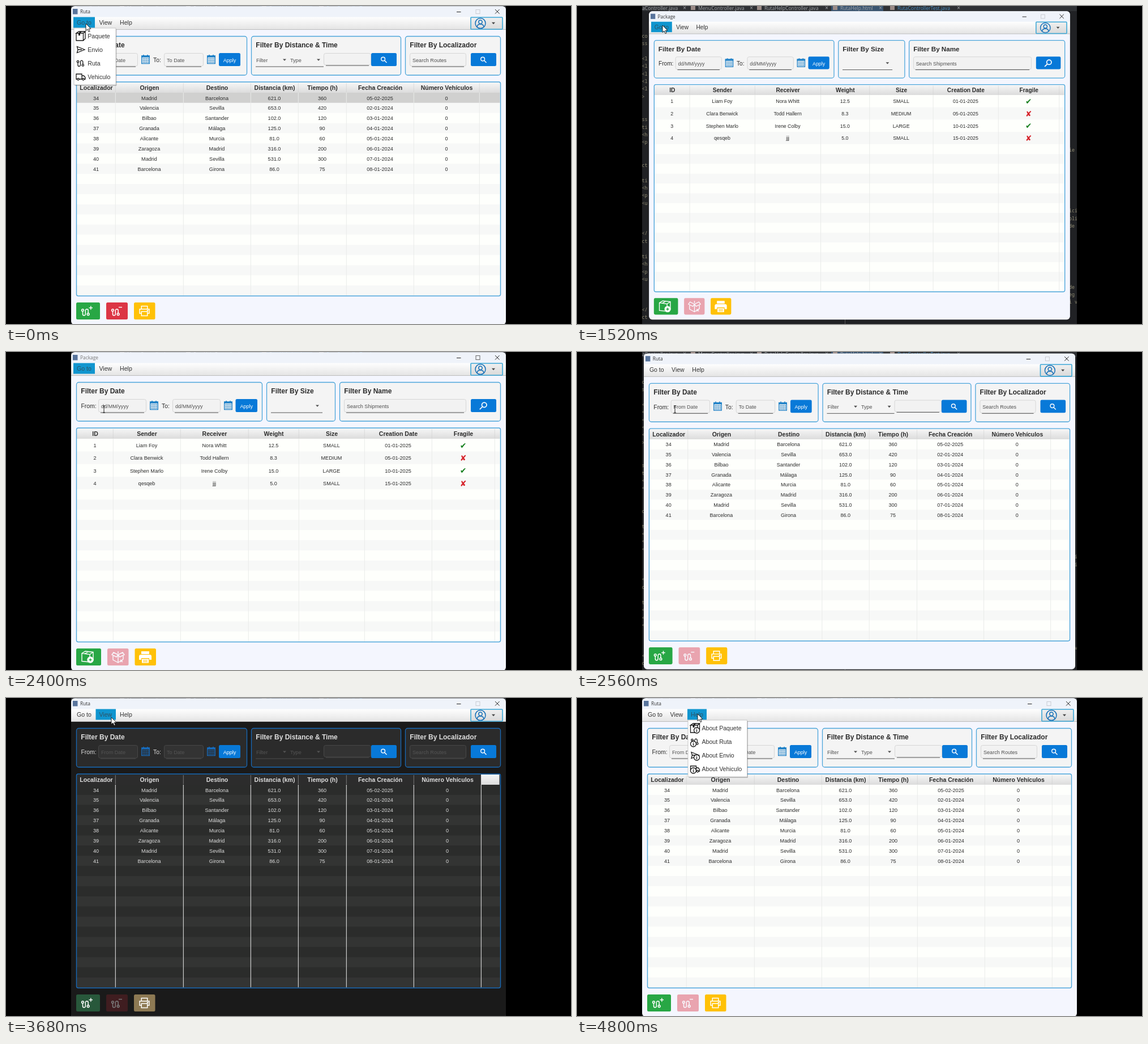
An HTML page that plays this animation: 998 px wide and 561 px high, repeating every 4880 ms.

```html
<!DOCTYPE html>
<html lang="es">
<head>
<meta charset="utf-8">
<title>Ruta</title>
<style>
html, body { margin: 0; width: 100%; height: 100%; overflow: hidden; background: #000; }
svg { display: block; --body: #f4f6fe; --panel: #f4f4f4; --edge: #4ba5da; --text: #2b2b2b; --hint: #505050;
  --field: #f2f2f2; --rim: #d6d6d6; --line: #555; --even: #fefffc; --odd: #f7f8f7; --grid: #e9ebe9;
  --head: url(#bar); --add: #28a745; --del: #dc3545; --print: #ffc107; --cal: #2283c8; }
.dark { --body: #1a1a1a; --panel: #2b2b2b; --edge: #1769b8; --text: #dedede; --hint: #555; --field: #333;
  --rim: #474747; --line: #4c4c4c; --even: #2b2c2b; --odd: #333433; --grid: #f0f0f0; --head: #2c2c2c;
  --add: #28583b; --del: #72222a; --print: #8d7953; --cal: #1769b8; }
.chrome { --text: #333; }
text { font-family: "Liberation Sans", Arial, sans-serif; fill: var(--text); white-space: pre; }
.title { font-family: "Open Sans", sans-serif; }
.code { font-family: "Noto Sans Mono", monospace; fill: #8f8a72; }
.tab { font-family: "Open Sans", sans-serif; fill: #a5a8ab; }
.blue { fill: #4b93c8; }
.hint { fill: var(--hint); }
.lit { fill: #fff; }
.yes { font-family: "DejaVu Sans", sans-serif; fill: #17801f; }
.no { font-family: "DejaVu Sans", sans-serif; fill: #d6232b; }
.item > rect { fill: none; }
.hot > rect { fill: #1095cf; }
.hot > text { fill: #2f5263; }
.unfocused { --text: #777; }
.ink { fill: none; stroke: #151515; stroke-width: 1.3; }
.white { fill: none; stroke: #fff; stroke-width: 1.4; }
</style>
</head>
<body>
<script>
const LOOP = 4880;

// Markup helpers
const rect = (x, y, w, h, fill, more = '') => `<rect x="${x}" y="${y}" width="${w}" height="${h}" fill="${fill}" ${more}/>`;
const text = (x, y, s, size, more = '') =>
  `<text x="${x}" y="${(y + size * .36).toFixed(2)}" font-size="${size}" ${more}>${s}</text>`;
const mid = (x, y, s, size, more = '') => text(x, y, s, size, 'text-anchor="middle" ' + more);
const path = (d, more = '') => `<path d="${d}" ${more}/>`;
const circle = (x, y, r, more = '') => `<circle cx="${x}" cy="${y}" r="${r}" ${more}/>`;
const group = (cls, body, more = '') => `<g class="${cls}" ${more}>${body}</g>`;
const at = (x, y, body, cls = '', k = 1) => group(cls, body, `transform="translate(${x} ${y}) scale(${k})"`);
const BOLD = 'font-weight="bold"';

// Icons, centred on 0,0
const route = circle(-5, -3, 1.7) + path('M-5 -1.3V3.2a2.2 2.2 0 0 0 4.4 0V-2.6a2.2 2.2 0 0 1 4.4 0V1.6') + circle(3.8, 3.4, 1.7);
const plane = path('M-6.5 -5.5L7 0L-6.5 5.5L-5 0ZM-5 0H2');
const truck = path('M-8 -5H2V4H-8ZM2 -2H5.5L8 1V4H2') +
  circle(-4.5, 4.2, 1.7, 'fill="#fff"') + circle(4.5, 4.2, 1.7, 'fill="#fff"');
const box = path('M-8 -5L-3.5 -8H8L4.5 -5ZM-8 -5V8H4.5V-5M4.5 8L8 4.5V-8') +
  path('M-4 -5L-1 -8H2L-1 -5V-1H-4Z', 'fill="#151515" stroke="none"');
const info = circle(3, 4, 5, 'fill="#fff"') + path('M3 3V7M3 1V2.2');
const lens = circle(-1.4, -1.4, 3.4) + path('M1.2 1.2L5 5');
const printer = path('M-5 -3V-8H5V-3M-5 4H-8V-3H8V4H5M-5 1H5V8H-5Z') + circle(5.3, -.6, .6, 'fill="#fff"');
const bigPrinter = rect(-7, -10, 14, 5, '#fff', 'stroke="none"') +
  path('M-11 5V-1a3 3 0 0 1 3 -3H8a3 3 0 0 1 3 3V5H7V2H-7V5Z', 'fill="#fff" stroke="none"') +
  rect(-6, 3.5, 12, 7, '#fff', 'stroke="none"') + path('M-4 6H4M-4 8.3H4', 'stroke="#ffc107" stroke-width="1"');
const parcel = path('M-10 -6L-4 -9.5L10 -8V6L4 9.5L-10 8ZM-10 -6L4 -4V9M4 -4L10 -8M-5 -5L2 -9') +
  circle(5, 5.5, 5, 'fill="#fff"') + path('M5 3V8M2.5 5.5H7.5', 'stroke="#28a745"');
const openParcel = path('M0 -4L-8 -8L-11 -4L-3 0L0 -4L8 -8L11 -4L3 0ZM-9 -2V5L0 10L9 4V-2M0 -4V10M0 -10V-6') +
  path('M4 5l4 4M8 5l-4 4');
const user = circle(0, 0, 9) + circle(0, -2.3, 3.2) + path('M-6 6.4C-5 0 5 0 6 6.4');

const caret = (x, y) => path(`M${x - 3} ${y - 1.6}h6l-3 3.4z`, 'fill="var(--hint)"');
const underline = (x1, x2, y = 107) => path(`M${x1} ${y}H${x2}`, 'stroke="var(--line)"');
const panel = (x1, x2, label) => rect(x1 + .5, 53.5, x2 - x1 - 1, 68.5, 'var(--panel)', 'stroke="var(--edge)" stroke-width="1.3" rx="4"') +
  text(x1 + 8.3, 69, label, 12, BOLD);
const field = (x1, x2, hint, h = 22.5) => rect(x1 + .5, 83.5, x2 - x1 - 1, h, 'var(--field)', 'stroke="var(--rim)" rx="3"') +
  underline(x1 + 4, x2 - 4, 84.5 + h) + text(x1 + 5, 95.5, hint, 9.1, 'class="hint"');
const blueButton = (x1, x2, body) => rect(x1, 83, x2 - x1, 23, '#0879d8', 'rx="2.5"') + body;
const search = (x1, x2) => blueButton(x1, x2, at((x1 + x2) / 2, 95, lens, 'white'));
const apply = (x1, x2) => blueButton(x1, x2, mid((x1 + x2) / 2, 95.5, 'Apply', 9.1, 'class="lit"'));
const action = (x1, x2, fill, body, more = '') => group('', rect(x1, 523, x2 - x1, 30, fill, 'rx="2.5"') + body, more);

function calendar(x) {
  let dots = '';
  for (let i = 0; i < 12; i++) dots += rect(x + 2.6 + i % 4 * 2.8, 92.3 + (i / 4 | 0) * 2.9, 1.8, 1.7, 'var(--cal)');
  return rect(x + .7, 88, 13.6, 13.5, 'none', 'stroke="var(--cal)" stroke-width="1.4"') +
    rect(x, 87.4, 15, 3.4, 'var(--cal)') + path(`M${x + 4} 86V89M${x + 11} 86V89`, 'stroke="var(--cal)" stroke-width="1.8"') + dots;
}

function dates(x, hint, w) {
  const to = x + w + 46;
  return text(132.5, 95.5, 'From:', 10.4) + field(x, x + w, hint[0]) + calendar(x + w + 6) +
    text(x + w + 27, 95.5, 'To:', 10.4) + field(to, to + w, hint[1]) + calendar(to + w + 6);
}

function table(heads, edges, rows, tall, selected) {
  const left = 125, right = 872.5, xs = [left, ...edges];
  let out = rect(124.5, 134.5, 749, 377, 'var(--even)', 'rx="3"'), y = 153;
  for (let i = 0; y < 510; i++) {
    const h = Math.min(i < rows.length ? tall : 17.9, 511 - y);
    out += rect(left, y, right - left, h, i === selected ? '#d0d0cf' : i % 2 ? 'var(--odd)' : 'var(--even)');
    (rows[i] || []).forEach((s, c) => {
      const mark = { '✔': 'yes', '✘': 'no' }[s];
      out += mid((xs[c] + xs[c + 1]) / 2, y + h / 2 + .3, s, mark ? 14 : 9.1, mark ? `class="${mark}"` : '');
    });
    y += h;
  }
  const last = edges[edges.length - 1];
  out += rect(left, 135, right - left, 18, 'var(--head)') + rect(last, 135, right - last - 1, 18, 'url(#bar)');
  heads.forEach((s, c) => out += mid((xs[c] + xs[c + 1]) / 2 + .5, 144.3, s, 10.5, BOLD));
  edges.forEach(x => out += path(`M${x + .3} 153V510.5`, 'stroke="var(--grid)"') +
    path(`M${x + .3} 136V152`, 'stroke="#ccc" stroke-opacity=".5"'));
  return out + rect(124.5, 134, 749, 377.5, 'none', 'stroke="var(--edge)" stroke-width="1.4" rx="3"');
}

const item = (x, y, w, h, body) => group('item', rect(x, y, w, h, 'none') + body);

function appWindow(id, title, body) {
  const bar = [['Go to', 119, 38, 125], ['View', 158.5, 35.5, 164.5], ['Help', 195, 34, 201]]
    .map(([s, x, w, tx]) => item(x, 19.5, w, 19, text(tx, 29.5, s, 10.6))).join('');
  const chrome = path('M115 20V6.5a6 6 0 0 1 6 -6H877a6 6 0 0 1 6 6V20Z', 'fill="#eff3fa"') +
    rect(118, 5, 8.5, 9.5, '#58749c') + text(131, 10.2, title, 8.4, 'class="title"') +
    path('M796 10.5h7.5', 'stroke="#222"') + rect(830, 6.5, 7, 7, 'none', 'class="max" stroke="#c9ccd2"') +
    path('M864 6l7.6 7.6m0 -7.6l-7.6 7.6', 'stroke="#222"') +
    rect(115, 19.5, 768, 22, 'url(#menubar)') + path('M115 41.5H883', 'stroke="#bcbcbc"') + group('bar', bar) +
    rect(821, 20, 56, 21, 'url(#button)', 'stroke="#3ba7d6" stroke-width="1.6" rx="1"') +
    at(838, 30.5, user, '').replace('class=""', 'fill="none" stroke="#1670b8" stroke-width="1.5"') +
    path('M858 28.8h6l-3 3.4z', 'fill="#444"');
  return `<g id="${id}">` + rect(115, .5, 768, 561.5, 'var(--body)', 'rx="6"') + group('chrome', chrome) + body + '</g>';
}

const ROUTES = `34,Madrid,Barcelona,621.0,360,05-02-2025
35,Valencia,Sevilla,653.0,420,02-01-2024
36,Bilbao,Santander,102.0,120,03-01-2024
37,Granada,Málaga,125.0,90,04-01-2024
38,Alicante,Murcia,81.0,60,05-01-2024
39,Zaragoza,Madrid,316.0,200,06-01-2024
40,Madrid,Sevilla,531.0,300,07-01-2024
41,Barcelona,Girona,86.0,75,08-01-2024`.split('\n').map(r => [...r.split(','), '0']);

const PARCELS = `1,Liam Foy,Nora Whitt,12.5,SMALL,01-01-2025,✔
2,Clara Benwick,Todd Hallern,8.3,MEDIUM,05-01-2025,✘
3,Stephen Marlo,Irene Colby,15.0,LARGE,10-01-2025,✔
4,qesqeb,jjj,5.0,SMALL,15-01-2025,✘`.split('\n').map(r => r.split(','));

const routes = (id, lastEdge, selected) => appWindow(id, 'Ruta',
  panel(124, 426, 'Filter By Date') + dates(163, ['From Date', 'To Date'], 70) + apply(376, 414) +
  panel(433, 698, 'Filter By Distance &amp; Time') +
  text(442, 95.5, 'Filter', 9.1, 'class="hint"') + caret(492, 95) + text(502, 95.5, 'Type', 9.1, 'class="hint"') + caret(552, 95) +
  underline(441, 561) + field(561, 645, '', 20.5) + search(645, 690) +
  panel(705, 874, 'Filter By Localizador') + field(713, 813, 'Search Routes') + search(821, 866) +
  table(['Localizador', 'Origen', 'Destino', 'Distancia (km)', 'Tiempo (h)', 'Fecha Creación', 'Número Vehículos'],
    [193, 313, 432, 516, 601, 720, lastEdge], ROUTES, 17.9, selected) +
  action(124, 166, 'var(--add)', at(141, 540, route, 'white', 1.1) + path('M146.5 532.5h6.5m-3.2 -3.3v6.6', 'class="white"')) +
  action(177, 215, 'var(--del)', at(194, 540, route, 'white', 1.1) + path('M199 531.5h6', 'class="white"'),
    selected === 0 ? '' : 'opacity=".42"') +
  action(226, 263.5, 'var(--print)', at(244.5, 538, printer, 'white', 1.05)));

const packages = appWindow('packages', 'Package',
  panel(124, 453, 'Filter By Date') + dates(163, ['dd/MM/yyyy', 'dd/MM/yyyy'], 85) + apply(405.5, 444) +
  panel(460, 582, 'Filter By Size') + underline(468, 559) + caret(550, 95) +
  panel(589, 874, 'Filter By Name') + field(597, 813, 'Search Shipments') +
  blueButton(821, 866, at(843, 95, group('', lens, 'transform="scale(-1.25 1.25)"'), 'white', 1)) +
  table(['ID', 'Sender', 'Receiver', 'Weight', 'Size', 'Creation Date', 'Fragile'],
    [189, 308, 428, 517, 633, 752, 863], PARCELS, 22.4) +
  action(124, 168, 'var(--add)', at(144, 537.5, parcel, 'white')) +
  action(179, 216.5, 'var(--del)', at(198, 538, openParcel, 'white'), 'opacity=".42"') +
  action(227.5, 265, 'var(--print)', at(246, 538, bigPrinter)));

const menu = (id, x, w, tx, ix, rows) => `<g id="${id}" class="chrome">` +
  rect(x + 1.5, 41, w, 100, '#000', 'opacity=".22" rx="1"') + rect(x, 39, w, 100, '#fff', 'stroke="#bdbdbd" stroke-width=".8"') +
  rows.map(([s, icon], i) => item(x, 41 + i * 24, w, 24, at(ix, 53 + i * 24, icon, 'ink') + text(tx, 53.3 + i * 24, s, 10.6))).join('') + '</g>';

const menus = menu('goMenu', 120, 74, 144.3, 132, [['Paquete', box], ['Envio', plane], ['Ruta', route], ['Vehiculo', truck]]) +
  menu('helpMenu', 196, 104.5, 220.5, 208.5,
    [['About Paquete', box + info], ['About Ruta', route + at(-6, 0, info)], ['About Envio', plane + info], ['About Vehiculo', truck + at(-6, -1, info)]]);

function editor() {
  const tabs = [['aController.java', 115], ['MenuController.java', 214], ['RutaHelpController.java', 331], ['RutaHelp.html', 465], ['RutaControllerTest.java', 566]];
  const ends = [190, 308, 441, 536, 674];
  let out = rect(115, 0, 768, 561, '#202124') + rect(115, 0, 768, 9, '#2f3134') + rect(449, 0, 92, 9, '#3b5570');
  tabs.forEach(([s, x], i) => out += text(x, 3.5, s, 8.6, `class="tab ${i === 4 ? 'blue' : ''}"`) +
    mid(ends[i], 3, '×', 10, 'class="tab"') + (i ? rect(x - 13, 0, 8, 7, '#9a8b86') : ''));
  const code = (x, y, rows) => rows.split('|').forEach((s, i) =>
    out += text(x, y + i * 13.42, s.replace('<', '&lt;'), 8.4, 'class="code"'));
  code(114.5, 52.5, 'co|ss||<l|<l|<l|<l|<l|>|||ss|ti|<h|<p|||ct||ti|<h|<p|<u||||</|ct||ti|<h|<p|<u||||</|ct');
  code(869, 254, 'ie||||||||ici|oli|de||||||||de|eg|i v');
  return out + path('M473.5 553V561', 'stroke="#555"');
}

const gradient = (id, a, b) => `<linearGradient id="${id}" x2="0" y2="1"><stop stop-color="${a}"/><stop offset="1" stop-color="${b}"/></linearGradient>`;
const arrow = path('M0 0V12.6L3 9.9L5 14.6L7.1 13.7L5.1 9.2H9Z', 'id="arrow" fill="#fff" stroke="#111" stroke-width=".9"');
const beam = path('M-2 -6H2M0 -6V6M-2 6H2', 'id="beam" fill="none" stroke="#222"');

document.body.innerHTML = `<svg width="998" height="561" viewBox="0 0 998 561"><defs>` +
  gradient('bar', '#f6f6f6', '#dcdcdc') + gradient('menubar', '#fefefe', '#e4e4e4') + gradient('button', '#f0f0f0', '#d9d9d9') +
  '<clipPath id="screen"><rect x="115" width="768" height="561"/></clipPath></defs>' + rect(0, 0, 998, 561, '#000') +
  group('', editor() + routes('first', 836, 0) + packages + routes('second', 839), 'clip-path="url(#screen)"') +
  menus + `<g id="cursor">${arrow}${beam}</g></svg>`;

const $ = id => document.getElementById(id);
const views = ['first', 'packages', 'second'].map($);
const bars = document.querySelectorAll('.bar');
const goItems = document.querySelectorAll('#goMenu .item');
const show = (node, on) => node.setAttribute('visibility', on ? 'visible' : 'hidden');

// When each window starts to open, and the pointer path as [ms, x, y]
const OPENS = [-LOOP, 1438, 2412], OPEN_MS = 260;
const TRACK = [[0, 141, 31], [240, 141, 31], [560, 158, 54], [900, 174, 76], [1100, 174, 76], [1300, 164, 54], [1420, 164, 54],
  [1520, 151, 34], [1720, 146, 31], [1960, 152, 42], [2240, 173, 101], [2640, 173, 101], [2960, 184, 33], [3180, 190, 52],
  [3340, 190, 52], [3600, 186, 34], [3960, 186, 34], [4160, 192, 54], [4300, 192, 54], [4520, 213, 28], [LOOP, 213, 28]];

function pointer(t) {
  const i = TRACK.findIndex(k => k[0] > t), [t0, x0, y0] = TRACK[i - 1], [t1, x1, y1] = TRACK[i];
  const p = (t - t0) / (t1 - t0), e = p * p * (3 - 2 * p);
  return [x0 + (x1 - x0) * e, y0 + (y1 - y0) * e];
}

function draw(t) {
  views.forEach((v, i) => {
    const opened = Math.min(1, (t - OPENS[i]) / OPEN_MS);
    const leaving = i < 2 ? Math.max(0, (t - OPENS[i + 1]) / OPEN_MS) : 0;
    const k = 1 - .1 * (1 - opened) ** 3;
    const alpha = Math.min(1, opened * 3.2) * Math.max(0, 1 - leaving * 4);
    show(v, opened > 0 && alpha > 0);
    v.setAttribute('opacity', Math.max(0, alpha));
    v.setAttribute('transform', `translate(499 281) scale(${k}) translate(-499 -281)`);
  });
  views[2].classList.toggle('dark', t >= 3280 && t < 4240);
  const stale = t >= 2380;
  views[1].querySelector('.title').classList.toggle('unfocused', stale);
  views[1].querySelector('.max').setAttribute('stroke', stale ? '#666' : '#c9ccd2');

  const active = t < 2412 ? 0 : t < 2960 ? -1 : t < 4480 ? 1 : 2;
  bars.forEach(b => [...b.children].forEach((c, i) => c.classList.toggle('hot', i === active)));
  show($('goMenu'), t < 1420 || t >= 1760 && t < 2360);
  show($('helpMenu'), t >= 4520);

  const [x, y] = pointer(t);
  goItems.forEach((c, i) => c.classList.toggle('hot', i === Math.floor((y - 41) / 24)));
  $('cursor').setAttribute('transform', `translate(${x.toFixed(2)} ${y.toFixed(2)})`);
  const typing = t >= 2360 && t < 2720;
  show($('arrow'), !typing);
  show($('beam'), typing);
}

const start = performance.now();
function tick() {
  draw((performance.now() - start) % LOOP);
  requestAnimationFrame(tick);
}
tick();
</script>
</body>
</html>
```
